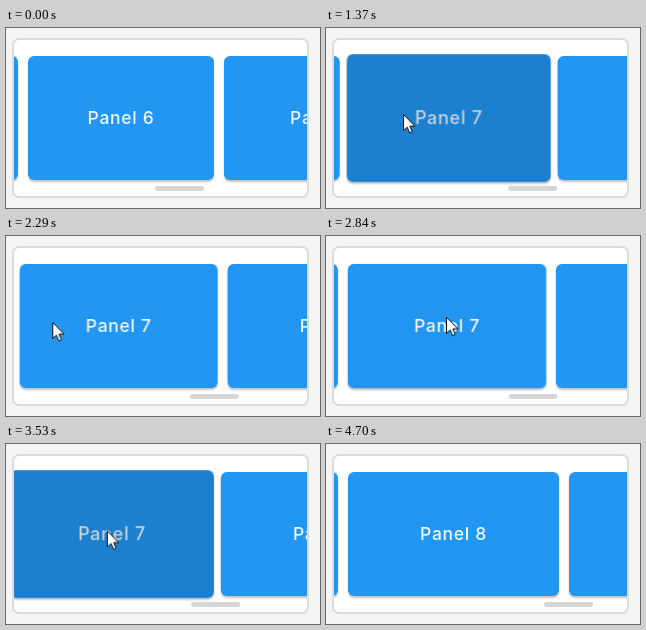
Recreate the animation shown at these times as an HTML page. Size 314x180 px, loop 5000 ms.

```html
<!DOCTYPE html>
<html lang="en">
<head>
<meta charset="utf-8">
<title>Panel carousel</title>
<style>
@property --s { syntax: "<number>"; inherits: true; initial-value: 0; }

html, body { margin: 0; width: 100%; height: 100%; overflow: hidden; background: #f5f5f5; }

.stage {
  position: relative; width: 314px; height: 180px; overflow: hidden;
  --in: cubic-bezier(.55, .1, .8, .6);
  --out: cubic-bezier(.215, .61, .355, 1);
  --sway: cubic-bezier(.45, .05, .55, .95);
  animation: scroll 5s linear infinite;
}
.view {
  position: absolute; left: 6px; top: 10px; width: 293px; height: 156px;
  border: 2px solid #dcdcdc; border-radius: 7px; background: #fff; overflow: hidden;
}
.track {
  position: absolute; left: -170px; top: 16px; display: flex; gap: 10px;
  transform: translateX(calc(var(--s) * -1px));
}
.panel {
  flex: none; height: 124px; border-radius: 6px; background: #2196f3; color: #f4f9fe;
  box-shadow: 0 2px 2px rgba(0, 0, 0, .24);
  font: 500 17.5px/124px Inter, "Open Sans", sans-serif; letter-spacing: .7px; text-align: center;
}
.pressed { animation: press 5s linear infinite; }
.bar {
  position: absolute; left: 140.5px; top: 146px; width: 49px; height: 5px;
  border-radius: 3px; background: #d4d6d7;
  transform: translateX(calc(var(--s) * .171px));
}
.cursor {
  position: absolute; left: 0; top: 0; width: 14px; height: 21px; overflow: visible;
  animation: point 5s linear infinite;
}

/* scroll offset in px: drag, snap, sway, flick */
@keyframes scroll {
  0%, 20.2% { --s: 0; animation-timing-function: var(--sway); }
  35.1%, 42.6% { --s: 247; animation-timing-function: var(--out); }
  48.6%, 56.8% { --s: 196; animation-timing-function: var(--in); }
  61.6% { --s: 219; animation-timing-function: var(--out); }
  65% { --s: 274; animation-timing-function: var(--sway); }
  71% { --s: 211; animation-timing-function: var(--sway); }
  76.6% { --s: 246; }
  77.4% { --s: 241; animation-timing-function: var(--out); }
  87.2%, 100% { --s: 404; }
}
@keyframes press {
  0%, 18.8%, 45%, 56.6%, 81%, 100% { filter: brightness(1); transform: none; }
  21.2%, 42.6%, 60%, 78.5% { filter: brightness(.85); transform: scale(1.03); }
}
@keyframes point {
  0%, 2.4% { transform: translate(290px, 184px); animation-timing-function: var(--sway); }
  11.8%, 19.8% { transform: translate(282px, 82px); animation-timing-function: var(--sway); }
  34.8%, 42.6% { transform: translate(29px, 87px); animation-timing-function: var(--in); }
  45.8% { transform: translate(46px, 86px); animation-timing-function: cubic-bezier(.3, .3, .6, .9); }
  53.4%, 56.4% { transform: translate(124px, 81px); animation-timing-function: var(--in); }
  61.6% { transform: translate(65px, 78px); animation-timing-function: var(--out); }
  64% { transform: translate(42px, 80px); animation-timing-function: var(--sway); }
  70% { transform: translate(105px, 86px); animation-timing-function: var(--sway); }
  75.6% { transform: translate(68px, 90px); animation-timing-function: var(--in); }
  78.4% { transform: translate(106px, 103px); animation-timing-function: var(--out); }
  87.8% { transform: translate(145px, 126px); }
  93.8%, 100% { transform: translate(245px, 184px); }
}
</style>
</head>
<body>
<div class="stage">
  <div class="view">
    <div class="track">
      <div class="panel" style="width:174px">Panel 5</div>
      <div class="panel" style="width:186px">Panel 6</div>
      <div class="panel pressed" style="width:198px">Panel 7</div>
      <div class="panel" style="width:211px">Panel 8</div>
      <div class="panel" style="width:223px">Panel 9</div>
    </div>
    <div class="bar"></div>
  </div>
  <svg class="cursor" viewBox="0 0 14 21">
    <path d="M.5 .5V16.5L4.2 13.1L6.6 18.8L9.2 17.7L6.8 12.1H11.8Z" fill="#fff" stroke="#111" stroke-width="1"/>
  </svg>
</div>
</body>
</html>
```
